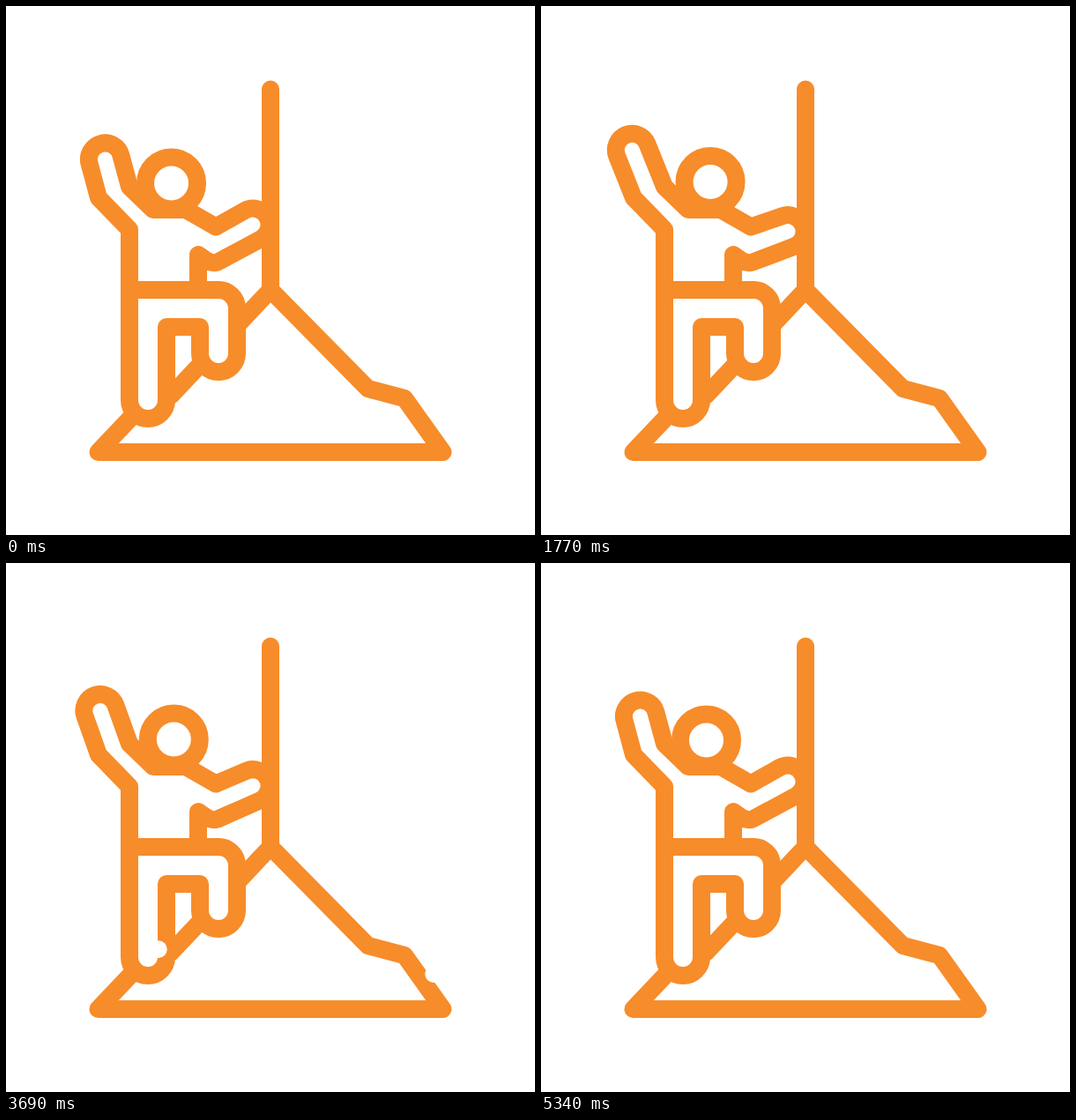
Animation, 600 px wide and 600 px high, one loop 5400 ms. Source, as an HTML page:

```html
<!DOCTYPE html>
<html lang="en">
<head>
<meta charset="utf-8">
<title>Climber</title>
<style>
  html, body { margin: 0; width: 100%; height: 100%; overflow: hidden; background: #fff; }
  svg { display: block; width: 100%; height: 100%; }
  .line { fill: none; stroke: #f78c2a; stroke-width: 20; stroke-linecap: round; stroke-linejoin: round; }
  .leg { fill: #fff; }
</style>
</head>
<body>
<svg viewBox="0 0 600 600">
  <path class="line" d="M187 442 L300 322 L410.5 434 L452 445 L495.5 506 H104.5 L142.5 466"/>
  <path class="line" d="M300 94.5 V322"/>
  <path class="line leg" d="M140 322 V447 a21 21 0 0 0 42 0 V364 H220 V394 a21 21 0 0 0 42 0 V343 a21 21 0 0 0 -21 -21 Z"/>
  <path class="line" id="body"/>
  <circle class="line" id="head" r="29.5"/>
  <g id="flakes" fill="#fff"></g>
</svg>
<script>
  const LOOP = 5400, SWAY = 1350, LEAD = 35;
  const HAND = 18.5;
  const FLAKE = 9.8, FALL = 0.085, DRIFT = -0.015, HALF_LIFE = 450, FADE = 120;
  const body = document.getElementById('body');
  const head = document.getElementById('head');
  const group = document.getElementById('flakes');

  // Where each flake is halfway through its fall, and when.
  const flakes = [
    { mid: 1200, x: 161, y: 231 },
    { mid: 2310, x: 125, y: 330 },
    { mid: 2310, x: 255, y: 492 },
    { mid: 2310, x: 447, y: 499 },
    { mid: 2970, x: 201, y: 380 },
    { mid: 3690, x: 173, y: 438 },
    { mid: 3690, x: 485, y: 466 },
    { mid: 4290, x: 186, y: 498 }
  ];
  for (const f of flakes) {
    f.el = group.appendChild(document.createElementNS('http://www.w3.org/2000/svg', 'circle'));
  }

  function place(el, x, y) {
    el.setAttribute('cx', x);
    el.setAttribute('cy', y);
  }

  // Forearm outline: out from elbow point a, round the hand, back to elbow point b.
  function forearm(a, b, x, y) {
    const dx = x - (a[0] + b[0]) / 2, dy = y - (a[1] + b[1]) / 2;
    const k = HAND / Math.hypot(dx, dy);
    const nx = dy * k, ny = -dx * k;
    return `L${a} L${x + nx} ${y + ny} A${HAND} ${HAND} 0 0 1 ${x - nx} ${y - ny} L${b}`;
  }

  function draw(now) {
    const t = now % LOOP;
    const s = (1 - Math.cos(2 * Math.PI * (t + LEAD) / SWAY)) / 2;

    const left = forearm([105, 217.5], [140, 205], 112.5 - 12 * s, 174 - 14 * s);
    const right = forearm([238, 250.5], [240, 290.5], 280, 248 + 10 * s);
    body.setAttribute('d',
      `M140 322 V253.5 ${left} L167 231 H204 ${right} Q234 292.5 228 289 L218 282 V322`);
    place(head, 187.5 + 6 * s, 201 - 2 * s);

    for (const f of flakes) {
      const dt = t - f.mid;
      const size = Math.max(0, Math.min(1, (HALF_LIFE - Math.abs(dt)) / FADE));
      place(f.el, f.x + DRIFT * dt, f.y + FALL * dt);
      f.el.setAttribute('r', FLAKE * size);
    }
  }

  const start = performance.now();
  function tick() {
    draw(performance.now() - start);
    requestAnimationFrame(tick);
  }
  tick();
</script>
</body>
</html>
```
